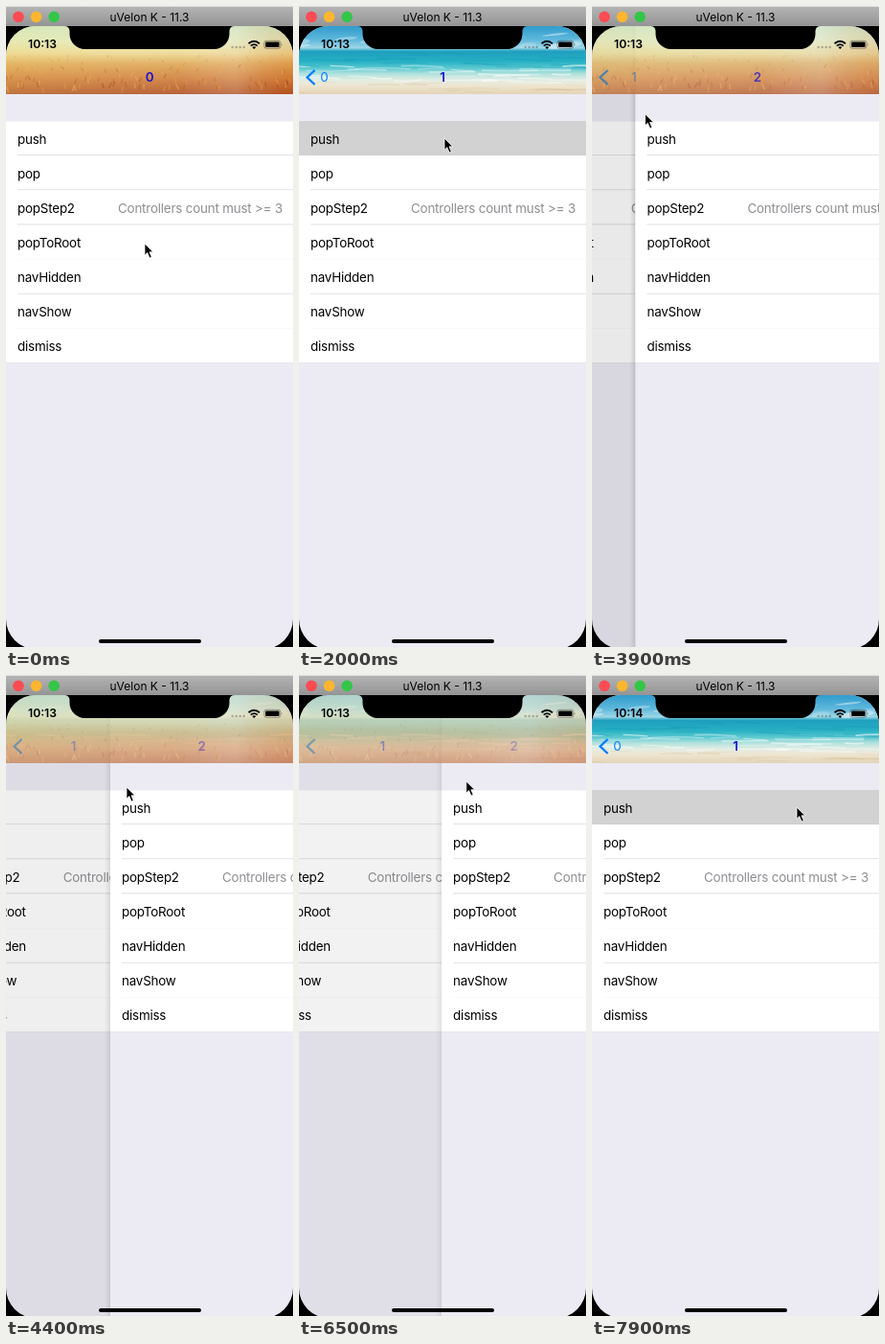
An HTML page that plays this animation: 300 px wide and 669 px high, repeating every 8 s.

```html
<!DOCTYPE html>
<html lang="en">
<head>
<meta charset="utf-8">
<title>Navigation demo</title>
<style>
html, body { margin: 0; width: 100%; height: 100%; overflow: hidden; background: #000; }
svg { display: block; width: 100vw; height: 100vh; }
text { font-family: Inter, Roboto, sans-serif; font-size: 13.4px; letter-spacing: -.2px; }
.detail { fill: #8e8e93; text-anchor: end; }
.title { font-weight: 600; fill: #1c10d0; text-anchor: middle; }
.back { text-anchor: middle; }
</style>
</head>
<body>
<svg id="stage" viewBox="0 0 300 669" xmlns="http://www.w3.org/2000/svg"></svg>
<script>
const LOOP = 8000, STEP = 100, W = 300;
const stage = document.getElementById('stage');
const rows = ['push', 'pop', 'popStep2', 'popToRoot', 'navHidden', 'navShow', 'dismiss'];
const lineAlpha = [.5, .5, .6, .1, .5, .1];

let seed = 7;
const rnd = (a, b) => {
  seed = (seed * 16807) % 2147483647;
  return a + (b - a) * seed / 2147483647;
};
const many = (n, f) => Array.from({ length: n }, (_, i) => f(i)).join('');
const gradient = (id, stops, dir = 'x2="0" y2="1"') => `<linearGradient id="${id}" ${dir}>` +
  stops.map(([o, c, a = 1]) => `<stop offset="${o}" stop-color="${c}" stop-opacity="${a}"/>`).join('') +
  '</linearGradient>';

const list = id => `<g id="${id}">
  <rect y="21" width="300" height="648" fill="#ecebf4"/>
  <rect y="120.5" width="300" height="252" fill="#fff"/>
  <rect id="${id}Hit" y="120" width="300" height="36" fill="#d2d2d2"/>
  ${lineAlpha.map((a, i) => `<rect x="12" y="${155 + 36.2 * i}" width="288" height="1" fill="#c8c7cc" opacity="${a}"/>`).join('')}
  <rect y="372" width="300" height=".6" fill="#c8c7cc" opacity=".5"/>
  ${rows.map((r, i) => `<text x="12" y="${143.8 + 36 * i}">${r}</text>`).join('')}
  <text class="detail" x="289" y="215.8">Controllers count must &gt;= 3</text>
</g>`;

const grass = () => `<g id="grass">
  <rect y="21" width="300" height="71" fill="url(#field)"/>
  <rect y="21" width="300" height="71" fill="url(#warm)"/>
  ${many(150, () => {
    const y = rnd(52, 91), d = (y - 52) / 40;
    const color = ['#f3c264', '#9c3f16', '#e8a545', '#b5561f'][Math.floor(rnd(0, 4))];
    return `<path d="M${rnd(0, 300)} ${y}l${rnd(-3, 3)} ${-2 - 4 * d}" stroke="${color}" stroke-width="${.7 + d}" opacity="${.2 + .22 * d}"/>`;
  })}
</g>`;

// Thin horizontal streaks between two heights
const streaks = (n, top, bottom, color, alpha) => many(n, () => {
  const w = rnd(15, 60);
  return `<path d="M${rnd(-30, 290)} ${rnd(top, bottom)}q${w / 2} ${rnd(-2, 2)} ${w} ${rnd(-1, 2)}" fill="none" stroke="${color}" stroke-width="${rnd(.6, 1.8)}" opacity="${rnd(alpha / 2, alpha)}"/>`;
});

const beach = () => `<g id="beach">
  <rect y="21" width="300" height="71" fill="url(#shore)"/>
  ${many(26, () => {
    const x = rnd(0, 300);
    return `<ellipse cx="${x}" cy="${rnd(28, 43)}" rx="${rnd(8, 20)}" ry="${rnd(1, 3.5)}" fill="#fff" opacity="${rnd(.15, .45)}" transform="rotate(-6 ${x} 36)"/>`;
  })}
  ${streaks(24, 48, 64, '#0f8fae', .3)}
  ${streaks(30, 62, 80, '#fff', .6)}
  ${streaks(14, 79, 91, '#d8c29a', .5)}
</g>`;

const lights = ['#fc4b53', '#fdb62e', '#34c648'];

stage.innerHTML = `<defs>
  ${gradient('bar', [[0, '#b6b5b6'], [1, '#959495']])}
  ${gradient('field', [[0, '#cbe6bd'], [.22, '#e2e9b8'], [.4, '#ecd78e'], [.55, '#dfa650'], [.78, '#cd7832'], [1, '#ad4c1c']])}
  ${gradient('warm', [[0, '#f3e7a0', .25], [.6, '#fff', .12], [.8, '#f4eef0', .25], [1, '#d05a20', .15]], 'x2="1" y2="0"')}
  ${gradient('shore', [[0, '#2f9ccc'], [.2, '#5fb8dc'], [.32, '#9dd6e6'], [.37, '#1f9fbe'], [.52, '#27b0c4'], [.62, '#5cc9d0'], [.7, '#b0e1dd'], [.79, '#e2ede4'], [.87, '#eee5d1'], [1, '#e4d4b6']])}
  ${gradient('edge', [[0, '#000', 0], [1, '#000', .15]], 'x2="1" y2="0"')}
  <clipPath id="glass"><rect y="21" width="300" height="650" rx="31"/></clipPath>
</defs>
<rect width="300" height="669" fill="#000"/>
<g clip-path="url(#glass)">
  ${list('lower')}
  <rect id="dim" y="21" width="300" height="648"/>
  <rect id="shade" y="21" width="6" height="648" fill="url(#edge)"/>
  ${list('upper')}
  ${beach()}${grass()}
  <path id="chevron" d="M16.5 67L8.6 74.5L16.5 82" fill="none" stroke-width="2.4"/>
  <text id="oldBack" class="back" x="26.3" y="79" fill="#0a7bff">0</text>
  <text id="newBack" class="back" y="79"></text>
  <text id="oldTitle" class="title" y="79"></text>
  <text id="newTitle" class="title" y="79"></text>
</g>
<path d="M61 21q5 0 5.5 5v3a16 16 0 0 0 16 16h135a16 16 0 0 0 16-16v-3q.5-5 5.5-5z"/>
<text id="clock" x="23" y="44.4" style="font-size:12.2px;font-weight:600;letter-spacing:0"></text>
${many(4, i => `<circle cx="${236.7 + 4 * i}" cy="43" r="1.3" opacity=".25"/>`)}
<g fill="none" stroke="#000" stroke-width="1.8">
  <path d="M253.6 39.2q5.7-5 11.4 0"/><path d="M255.8 41.6q3.5-3 7 0"/>
</g>
<path d="M257.3 43.1q2-1.6 4 0l-2 2z"/>
<rect x="269.9" y="36.3" width="17" height="8" rx="2.2" fill="none" stroke="#000" stroke-opacity=".45" stroke-width=".8"/>
<rect x="271.2" y="37.6" width="14.4" height="5.4" rx="1"/>
<path d="M287.8 38.8q1.6 1.5 0 3z" opacity=".5"/>
<rect x="97" y="661" width="107" height="4" rx="2"/>
<rect width="300" height="21" fill="url(#bar)"/>
<rect width="300" height="1" fill="#dcdcdc"/>
${lights.map((c, i) => `<circle cx="${13 + 18.6 * i}" cy="11.3" r="5.8" fill="${c}"/>`).join('')}
<text x="150" y="16" text-anchor="middle" style="font-size:12px;letter-spacing:0">uVelon K - 11.3</text>
<path id="cursor" d="M0 0V12.2L2.8 9.6L5.1 15L7.3 14L5 8.8H8.8Z" stroke="#fff" stroke-width=".8"/>`;

const el = {};
stage.querySelectorAll('[id]').forEach(e => el[e.id] = e);
const set = (id, attrs) => {
  for (const k in attrs) el[id].setAttribute(k, attrs[k]);
};

// Eased value of a track of [time, ...values] keys
function track(keys, t) {
  const i = keys.findIndex(k => k[0] > t);
  if (i === 0) return keys[0].slice(1);
  if (i < 0) return keys[keys.length - 1].slice(1);
  const a = keys[i - 1], b = keys[i], u = (t - a[0]) / (b[0] - a[0]);
  const e = u * u * (3 - 2 * u);
  return a.slice(1).map((v, j) => v + (b[j + 1] - v) * e);
}

const pointer = [
  [0, 145, 248], [600, 152, 138], [2600, 152, 138], [3200, 5, 109.5], [3500, 5, 109.5],
  [4400, 126, 117], [4900, 126, 117], [5500, 10, 111], [5700, 10, 111], [5800, 12, 111],
  [7000, 273, 111], [7300, 288, 113], [7900, 214, 138]
];
const swipe = [
  [3500, 0], [4400, 109], [4900, 109], [5500, 0], [5800, 0], [7000, 239], [7400, 300]
];
const taps = [900, 2000, 7900], SWIPE = 3500;

// Critically damped slide, 1 to 0
function slide(ms) {
  const s = Math.max(0, ms) * .0179, v = (1 + s) * Math.exp(-s);
  return v < .002 ? 0 : v;
}

function draw(t) {
  const n = t < taps[1] - 100 ? 0 : 1;
  const q = t >= SWIPE ? track(swipe, t)[0] / W : slide(t - taps[n]);
  const p = 1 - q, x = W * q;
  const pressed = taps.some(at => t >= at && t < at + 100);

  set('lower', { transform: `translate(${-90 * p})` });
  set('upper', { transform: `translate(${x})` });
  set('lowerHit', { opacity: pressed ? 1 : 0 });
  set('upperHit', { opacity: 0 });
  set('dim', { opacity: .1 * p });
  set('shade', { x: x - 6, opacity: p });
  set('grass', { opacity: n ? p : q });
  set('beach', { opacity: n ? q : p });

  const blue = n && q < .5 ? '#2477bd' : '#0a7bff';
  const joint = 25 + 125 * q;
  set('chevron', { stroke: blue, opacity: n ? 1 - .5 * Math.sin(Math.PI * q) : p });
  set('oldBack', { opacity: n ? Math.max(0, (q - .85) / .15) : 0 });
  set('newBack', { x: joint, fill: blue, opacity: p ** 3 });
  set('oldTitle', { x: joint, opacity: q ** 1.7 });
  set('newTitle', { x: 150 + 150 * q, opacity: p * p });
  el.newBack.textContent = el.oldTitle.textContent = n;
  el.newTitle.textContent = n + 1;
  el.clock.textContent = t < 7500 ? '10:13' : '10:14';

  const [cx, cy] = track(pointer, t);
  set('cursor', { transform: `translate(${cx} ${cy})` });
}

const start = performance.now();
function tick() {
  const t = (performance.now() - start) % LOOP;
  draw(Math.floor(t / STEP) * STEP);
  requestAnimationFrame(tick);
}
tick();
</script>
</body>
</html>
```
